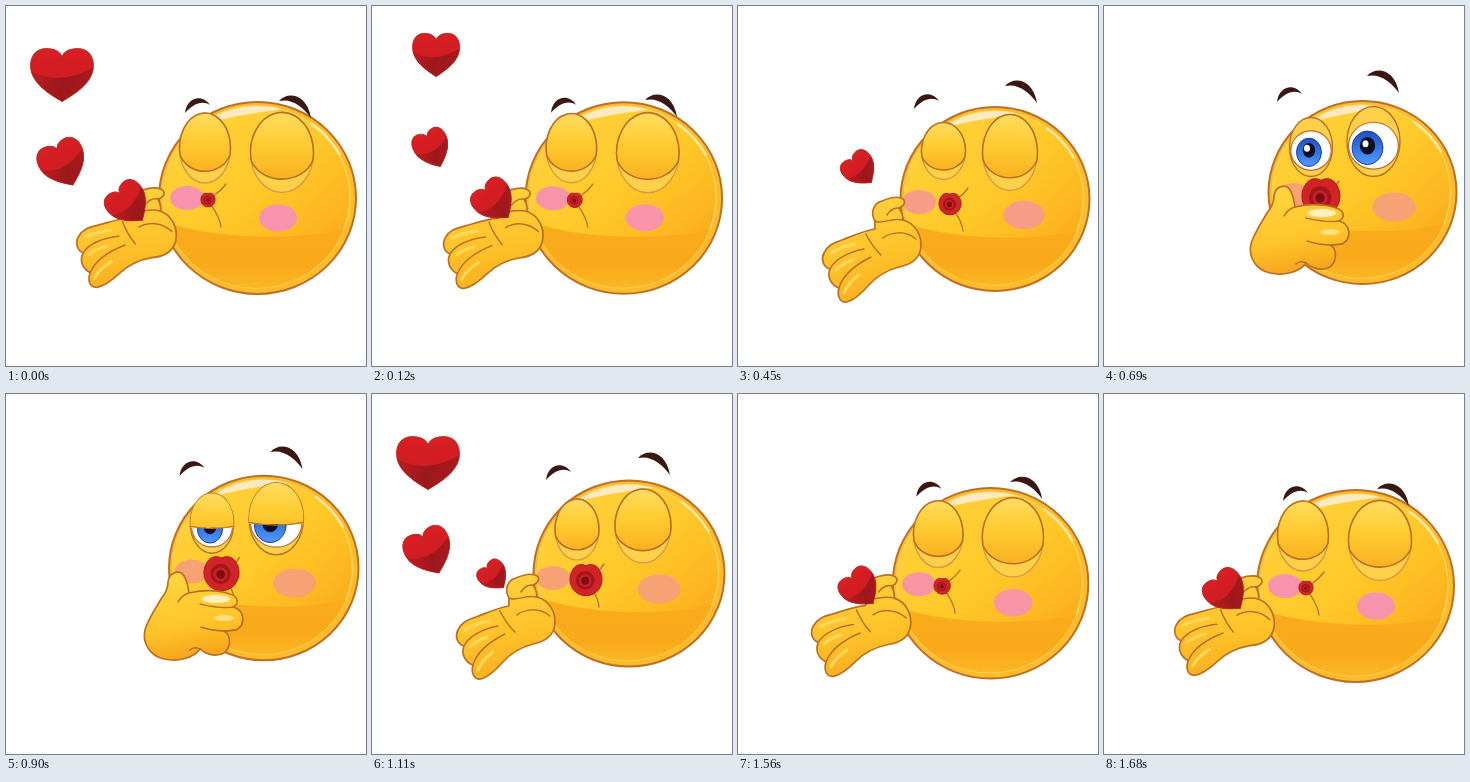
Write an HTML page with a canvas that moves like this. It is 360 px wide and 360 px high and loops after 1740 ms.

```html
<!DOCTYPE html>
<html lang="en">
<head>
<meta charset="utf-8">
<title>Blown kiss</title>
<style>
html, body { margin: 0; width: 100%; height: 100%; overflow: hidden; background: #fff; }
canvas { display: block; width: 360px; height: 360px; }
</style>
</head>
<body>
<canvas id="stage" width="360" height="360"></canvas>
<script>
const ctx = document.getElementById('stage').getContext('2d');
const LOOP = 1740;
const STEPS = [0, 30, 135, 240, 360, 450, 570, 690, 780, 900, 1020, 1110, 1230, 1350, 1440, 1560, 1680];
const EDGE = '#bb7026';

// Eyes: centre and radii. Brows: outer start points of both. Heart: height and size.
const POSES = [
  { t: 0, head: [251.5, 192, 99.5], left: [199, 142, 25.5, 35], right: [276, 146.5, 31.5, 40],
    brows: [180, 106, 273, 96], cheek: [272, 212], lips: [202, 194, 7], hand: [0], heart: [195, 37] },
  { t: 240, head: [254, 192.5, 97.5], left: [202, 143.5, 24, 31.5], right: [274.5, 148, 29.5, 40],
    brows: [180, 103, 274, 88], cheek: [279, 210], lips: [208, 196, 10], hand: [0], heart: [173, 34] },
  { t: 450, head: [257, 193, 95.5], left: [205.5, 145, 22, 28.5], right: [272, 146.5, 27.5, 38],
    brows: [177, 102, 267, 81], cheek: [286, 209], lips: [212, 198, 11], hand: [7], heart: [161, 30] },
  { t: 690, head: [258.5, 186.5, 95], left: [207, 141, 21.5, 29.5], right: [269.5, 135.5, 26.5, 35],
    brows: [174, 95, 263, 71], cheek: [290, 201], lips: [217, 191, 19], hand: [0], heart: [180, 26] },
  { t: 1110, head: [257, 179.5, 96.5], left: [205, 135.5, 22, 30.5], right: [271, 132, 28, 37],
    brows: [175, 85, 266, 65], cheek: [287, 195], lips: [214, 186, 16], hand: [-4], heart: [180, 26] },
  { t: 1350, head: [254.5, 184.5, 97.5], left: [202.5, 137, 23.5, 30.5], right: [273, 138, 29, 39],
    brows: [178, 94, 271, 77], cheek: [281, 203], lips: [208, 189, 10], hand: [-5], heart: [186, 29] }
];
POSES.push({ ...POSES[0], t: 1680 });

const LIFT = { 780: -5, 900: -9, 1020: -4 };
const EYES_OPEN = { 570: 0.5, 690: 1, 780: 1, 900: 0.5 };
const COVER_SHIFT = { 570: [-14, 9], 690: [0, 0], 780: [0, 2], 900: [-8, 7] };
const FLIGHT = { 0: 0, 30: 0.3, 135: 0.65, 240: 1, 1110: 0, 1230: 0.65 };

const PALM = new Path2D('M130 208C125 199 129 190 137 188C144 185 151 183 156 185C162 187 160 193 154 195C157 199 158 203 158 207C170 210 177 222 176 234C175 247 164 252 154 254C143 257 133 262 124 272C117 280 110 287 102 289C95 290 92 283 94 275C86 272 82 264 85 256C78 254 76 246 79 240C82 233 88 230 97 227C108 223 118 218 130 216Z');
const PALM_LINES = new Path2D('M85 256C90 246 104 239 119 236M94 275C98 262 110 252 126 244M121 221Q127 233 136 242M130 208C137 212 147 204 158 207M138 225C146 219 160 217 171 226M154 195Q147 194 142 202');
const PALM_GLOSS = new Path2D('M86 240Q95 234 110 231M91 257Q98 250 108 247M99 280Q103 270 114 262');
const COVER = new Path2D('M170 190C171 180 182 177 186 184C190 190 190 196 191 201C204 198 220 198 232 202C241 205 241 212 235 215C247 218 248 233 238 238L226 239C234 243 233 258 224 262C215 265 206 261 202 257C196 266 180 270 166 267C152 264 144 251 147 238C150 227 158 216 163 207C168 201 170 196 170 190Z');
const COVER_LINES = new Path2D('M235 215C223 217 211 214 202 212M238 238C225 240 212 238 203 235M202 257Q196 254 192 258M191 201Q184 203 180 210');
const HEART = new Path2D('M0 .5C-.25 .33-.5 .12-.5-.18C-.5-.4-.38-.5-.25-.5C-.1-.5 0-.42 0-.32C0-.42 .1-.5 .25-.5C.38-.5 .5-.4 .5-.18C.5 .12 .25 .33 0 .5Z');
const HEART_SHADE = new Path2D('M-.5-.08Q-.05 .22 .5-.14L.6 .6L-.6 .6Z');
const LIPS = new Path2D('M0-.88C.2-1.02 .65-1.02 .85-.6C1.1-.2 1.05 .4 .65 .75C.3 1.06-.3 1.06-.65 .75C-1.05 .4-1.1-.2-.85-.6C-.65-1.02-.2-1.02 0-.88Z');
const BROW_L = new Path2D('M-1 1C1-16 17-18 24-7C16-12 7-8-1 1Z');
const BROW_R = new Path2D('M0-1C9-11 28-8 32 16C24 5 13-4 0-1Z');

const mix = (a, b, u) => a + (b - a) * u;
const clamp = v => Math.max(0, Math.min(1, v));

function poseAt(t) {
  let i = POSES.length - 2;
  while (POSES[i].t > t) i--;
  const a = POSES[i], b = POSES[i + 1];
  const u = clamp((t - a.t) / (b.t - a.t));
  const pose = {};
  for (const key in a) {
    if (key !== 't') pose[key] = a[key].map((v, n) => mix(v, b[key][n], u));
  }
  return pose;
}

function gradient(x0, y0, x1, y1, ...stops) {
  const g = ctx.createLinearGradient(x0, y0, x1, y1);
  stops.forEach(([at, color]) => g.addColorStop(at, color));
  return g;
}

function placed(x, y, draw) {
  ctx.save();
  ctx.translate(x, y);
  draw();
  ctx.restore();
}

function ellipse(x, y, rx, ry, fill, stroke, width = 1.5) {
  ctx.beginPath();
  ctx.ellipse(x, y, rx, ry, 0, 0, Math.PI * 2);
  if (fill) { ctx.fillStyle = fill; ctx.fill(); }
  if (stroke) { ctx.strokeStyle = stroke; ctx.lineWidth = width; ctx.stroke(); }
}

function line(path, color, width) {
  ctx.strokeStyle = color;
  ctx.lineWidth = width;
  ctx.stroke(path);
}

function drawHead([cx, cy, r]) {
  const ry = r - 2.5;
  ellipse(cx, cy, r - 1, ry - 1, '#fdbb2c', EDGE, 2);
  placed(cx, cy, () => {
    const skin = gradient(-60, -ry * 0.8, 70, ry * 0.8, [0, '#ffd23a'], [0.45, '#ffc929'], [0.75, '#fdb721'], [1, '#f9a61a']);
    ellipse(-1, -1, r - 6, ry - 6, skin, '#ffd458', 1.5);
    ctx.clip();
    ctx.fillStyle = gradient(0, 25, 0, ry, [0, '#faac1b'], [0.6, '#f9a91a'], [1, '#fdbb28']);
    ctx.beginPath();
    ctx.moveTo(-r, 22);
    ctx.bezierCurveTo(-45, 42, 45, 44, r, 28);
    ctx.lineTo(r, r);
    ctx.lineTo(-r, r);
    ctx.fill();
  });
  placed(cx, cy, () => {
    ctx.fillStyle = '#fdeac0';
    ctx.beginPath();
    ctx.ellipse(0, 0, r - 6, ry - 5, 0, -2.2, -1.3);
    ctx.quadraticCurveTo(-20, -ry * 0.86, -r * 0.55, -ry * 0.76);
    ctx.fill();
    ctx.strokeStyle = '#ffeaa8';
    ctx.lineWidth = 2.5;
    ctx.beginPath();
    ctx.ellipse(0, 0, r - 6, ry - 6, 0, -0.95, -0.5);
    ctx.stroke();
  });
}

function drawEye([x, y, rx, ry], open, side) {
  placed(x, y, () => {
    const lid = gradient(0, -ry, 0, ry * 0.7, [0, '#ffdc60'], [0.45, '#ffcd32'], [1, '#f9b01f']);
    ellipse(0, 0, rx, ry, '#ffd04a', open ? EDGE : '#d99a45', 1.4);
    if (open) {
      ellipse(0, ry * 0.12, rx * 0.94, ry * 0.67, '#fff', EDGE, 1.2);
      ctx.save();
      ctx.clip();
      const ix = side < 0 ? -2 : -6, iy = ry * 0.18;
      const iris = gradient(0, iy - ry / 2, 0, iy + ry / 2, [0, '#1c4fc4'], [1, '#4f9bff']);
      ellipse(ix, iy, rx * 0.58, ry * 0.48, iris, '#1d3f9c', 1);
      ellipse(ix, iy - 2, rx * 0.29, ry * 0.25, '#0b0f25');
      ellipse(ix - 2, iy - 4, 3, 3.5, '#fff');
      ctx.restore();
      if (open < 1) {
        ctx.save();
        ellipse(0, 0, rx, ry);
        ctx.clip();
        ctx.fillStyle = lid;
        ctx.fillRect(-rx, -ry, rx * 2, ry * 1.15);
        ctx.restore();
        ctx.beginPath();
        ctx.moveTo(-rx, ry * 0.1);
        ctx.quadraticCurveTo(0, ry * 0.25, rx, ry * 0.1);
        ctx.stroke();
      }
      return;
    }
    ctx.beginPath();
    ctx.ellipse(0, 0, rx, ry, 0, Math.PI - 0.2, Math.PI * 2 + 0.2);
    ctx.bezierCurveTo(rx * 0.65, ry * 0.82, -rx * 0.65, ry * 0.82, -rx * 0.98, ry * 0.2);
    ctx.fillStyle = lid;
    ctx.fill();
    ctx.strokeStyle = EDGE;
    ctx.lineWidth = 1.6;
    ctx.stroke();
  });
}

function drawCheeks(pose) {
  const [lx, ly, r] = pose.lips, u = clamp((r - 7) / 6);
  const color = `rgb(247,${mix(147, 162, u)},${mix(172, 116, u)})`;
  ellipse(181 + Math.max(0, lx - 214) * 3, ly - 2, 17, 12, color);
  ellipse(...pose.cheek, mix(19, 21.5, u), mix(13.5, 14.5, u), color);
}

function drawMouth([x, y, r]) {
  ctx.strokeStyle = EDGE;
  ctx.lineWidth = 1.3;
  ctx.beginPath();
  ctx.moveTo(x + r * 0.8, y - r * 0.6);
  ctx.quadraticCurveTo(x + 13, y - 9, x + 18, y - 16);
  ctx.moveTo(x + r * 0.5, y + r * 0.8);
  ctx.quadraticCurveTo(x + 12, y + 18, x + 13, y + 27);
  ctx.stroke();
  placed(x, y, () => {
    ctx.scale(r, r);
    ctx.fillStyle = '#d02426';
    ctx.fill(LIPS);
    line(LIPS, '#b01a1c', 1 / r);
    ellipse(-0.05, 0.02, 0.58, 0.58, '#a5151a');
    ellipse(-0.05, 0.04, 0.4, 0.4, '#c42226');
    ellipse(-0.05, 0.05, 0.24, 0.25, '#7a0e12');
  });
}

function drawBrows([lx, ly, rx, ry]) {
  ctx.fillStyle = '#3b1712';
  placed(lx, ly, () => ctx.fill(BROW_L));
  placed(rx, ry, () => ctx.fill(BROW_R));
}

function drawPalm(pose) {
  const turn = clamp((10 - pose.lips[2]) / 3);
  placed(176 + (pose.head[0] - 254) * 2.3, 230 + pose.hand[0], () => {
    ctx.rotate(turn * 0.1);
    ctx.translate(-176, -230);
    ctx.fillStyle = gradient(120, 190, 140, 285, [0, '#ffd03a'], [0.5, '#ffc42b'], [1, '#f9b01f']);
    ctx.fill(PALM);
    line(PALM_GLOSS, '#ffd75c', 3);
    line(PALM, EDGE, 1.7);
    line(PALM_LINES, EDGE, 1.5);
  });
}

function drawCover([dx, dy]) {
  placed(dx, dy, () => {
    ctx.fillStyle = gradient(180, 180, 195, 268, [0, '#ffd640'], [0.6, '#ffc52a'], [1, '#f5a31a']);
    ctx.fill(COVER);
    ellipse(218, 207, 14, 4, '#fff0c4');
    ellipse(226, 226, 10, 3, '#ffe07a');
    line(COVER, EDGE, 1.7);
    line(COVER_LINES, EDGE, 1.5);
  });
}

function drawHeart(x, y, w, h, turn) {
  placed(x, y, () => {
    ctx.rotate(turn);
    ctx.scale(w, h);
    ctx.fillStyle = gradient(0, -0.5, 0, 0.2, [0, '#d81f24'], [1, '#cf1c21']);
    ctx.fill(HEART);
    ctx.save();
    ctx.clip(HEART);
    ctx.fillStyle = gradient(-0.4, 0, 0.4, 0.2, [0, '#b81b1f'], [0.5, '#9c181c'], [1, '#a8191d']);
    ctx.fill(HEART_SHADE);
    ctx.restore();
    line(HEART, '#b02a22', 0.9 / Math.max(w, h));
  });
}

function drawFlight(u) {
  const w = mix(63, 10, u), h = mix(53, 20, u);
  drawHeart(56 + 27 * u, 69 - 36 * Math.sin(u * 1.974), w, h, 0);
  if (u < 1) drawHeart(57.5 + 10 * u, 158 - 50 * u, mix(47, 9, u), mix(46, 20, u), -0.42);
}

// The blown heart leans toward its tip, so its box centre lies off the drawing centre.
function drawBlown([y, size]) {
  drawHeart(120 + size * 0.08, y + size * 0.09, size * 1.12, size * 1.12, -0.7);
}

function draw(time) {
  const step = STEPS.filter(s => s <= time).pop();
  const pose = poseAt(step);
  const open = EYES_OPEN[step] || 0;
  const cover = COVER_SHIFT[step];
  ctx.clearRect(0, 0, 360, 360);
  ctx.lineJoin = ctx.lineCap = 'round';

  placed(0, LIFT[step] || 0, () => {
    drawHead(pose.head);
    drawCheeks(pose);
    drawEye(pose.left, open, -1);
    drawEye(pose.right, open, 1);
    drawBrows(pose.brows);
    drawMouth(pose.lips);
    if (cover) drawCover(cover);
    else drawPalm(pose);
  });

  if (step < 570 || step >= 1110) drawBlown(pose.heart);
  if (step in FLIGHT) drawFlight(FLIGHT[step]);
}

function tick() {
  draw(performance.now() % LOOP);
  requestAnimationFrame(tick);
}
tick();
</script>
</body>
</html>
```
